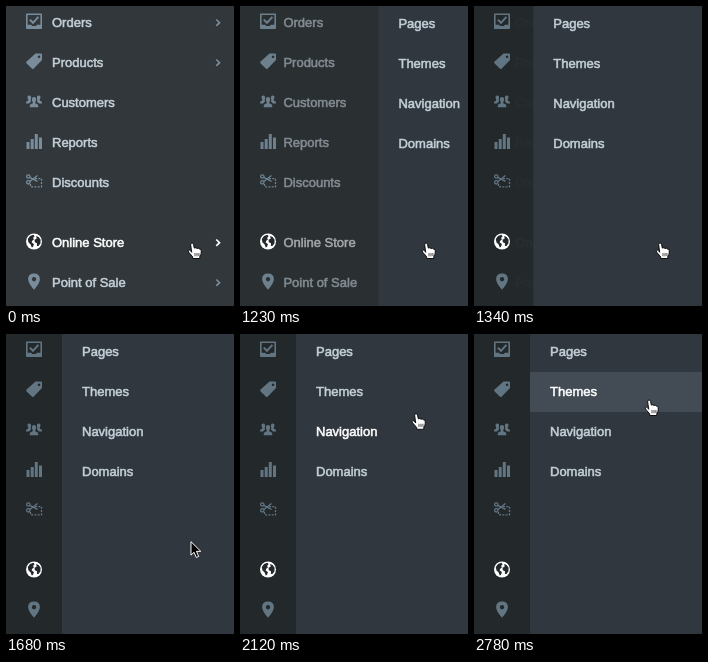
Write an HTML page that moves like this. It is 228 px wide and 300 px high and loops after 3.92 s.

```html
<!DOCTYPE html>
<html lang="en">
<head>
<meta charset="utf-8">
<title>Sliding navigation</title>
<style>
html, body { margin: 0; width: 100%; height: 100%; overflow: hidden; background: #31373a; }
svg { display: block; width: 228px; height: 300px; }
text { font: 13px "Liberation Sans", Arial, sans-serif; fill: currentColor; stroke: currentColor; stroke-width: .55px; }
.line { fill: none; stroke: currentColor; }
</style>
</head>
<body>
<svg viewBox="0 0 228 300">
  <rect id="side" width="228" height="300"/>
  <g id="icons" fill="currentColor">
    <path class="line" stroke-width="1.6" stroke-linejoin="round" d="M20.8 8.3h14.4v14H20.8z"/>
    <path class="line" stroke-width="2" d="M23.8 13.6l3.2 3.2 5.4-6"/>
    <path d="M21 18.8h4l1.200 1.200h3.600l1.200-1.200h4V22H21z"/>
    <path fill-rule="evenodd" d="M29.5 47.500h5.500q1 0 1 1v5.500l-8.200 8.500q-1 1-2 0l-5.200-5q-1-1 0-2zM33 49.500a1.300 1.300 0 1 0 .1 0z"/>
    <path d="M23.400 89.500a2 2.300 0 0 1 1.600 3.300q-.8 1.800.2 2.700-1.700.9-2 2H20v-1q0-1.200 2-1.800.7-.8-.2-2.300-1-2.700 1.600-2.900zM32.600 89.500a2 2.300 0 0 0-1.600 3.300q.8 1.800-.2 2.700 1.700.9 2 2H36v-1q0-1.200-2-1.800-.7-.8.2-2.300 1-2.700-1.600-2.900z"/>
    <path d="M28 91q2.300 0 2.100 3-.2 1.500-.9 2.300v1q3.100.8 3.100 2.600v1.400h-8.600v-1.400q0-1.800 3.100-2.600v-1q-.7-.8-.9-2.300Q25.700 91 28 91z"/>
    <path d="M20.500 136h3v7h-3zM24.700 133h3v10h-3zM28.800 128h3v15h-3zM33 131.500h3V143h-3z"/>
    <g class="line" stroke-width="1.300">
      <circle cx="22.300" cy="170.500" r="1.700"/><circle cx="22.300" cy="176.300" r="1.700"/>
      <path d="M23.800 171.400l7.700 4M23.800 175.400l7.700-5.800"/>
      <path stroke-dasharray="2 1.300" d="M29 172.600h6.500v8.200H24.500v-3"/>
    </g>
    <g color="#fff">
      <circle cx="28" cy="235.500" r="8" fill="currentColor"/>
      <path fill="#23282c" d="M21.800 233l2.200-3 3.400-1.200 1.200 1.500-1.600 1.600 1 1.300-2 1.700-.3 1.700 2.200 1.400-.8 2.700-1.300.7-1.300-3.200-2-1.700zM30 230l2.600 1 2 2.800-.2 3.700-2 2.600-1.500-.2.100-2.700-2.200-1-.2-2.400 2.200-1.300z"/>
    </g>
    <path fill-rule="evenodd" d="M28 267.500q5.900 0 5.900 5.800 0 3.700-5.900 10.500-5.900-6.800-5.900-10.500 0-5.800 5.900-5.800zm0 3.500a2.200 2.200 0 1 0 .1 0z"/>
  </g>
  <g id="labels"></g>
  <g id="chevrons"></g>
  <g id="panel">
    <rect width="228" height="300" fill="#31373e"/>
    <rect id="row" y="38" width="228" height="40" fill="#434c55"/>
  </g>
  <g id="hand" stroke="#000" stroke-linejoin="round">
    <path fill="#fff" stroke-width=".9" d="M4.200 9.800L3.200 2.400Q3 .7 4.400.5 5.700.4 6 1.800L6.800 5.600Q8.800 4.600 9.400 6 11.200 5.200 11.800 6.500 13.500 6.200 13.700 8V10.500Q13.700 12 12.300 13.800V16H5.200V14.300L1 9.500Q.2 8 1.400 7.400 2.500 7 4.200 9.800z"/>
    <path fill="none" stroke-width=".7" d="M7.500 10.500v3.300M9.500 10.500v3.300M11.400 10.500v3"/>
  </g>
  <path id="arrow" fill="#000" stroke="#fff" d="M0 0v13.500l3.100-2.900 2.200 5.200 2.400-1-2.200-5.100h4.300z"/>
</svg>
<script>
const $ = id => document.getElementById(id);
const LOOP = 3920, OPEN = 1206, SLIDE = 172, EDGE = 56;
const TEXT = '#c4d0d9', ICON = '#798c9c';

function add(parent, tag, attrs, content = '') {
  const el = document.createElementNS('http://www.w3.org/2000/svg', tag);
  for (const name in attrs) el.setAttribute(name, attrs[name]);
  el.textContent = content;
  return parent.appendChild(el);
}

const menu = [['Orders', 16, 1], ['Products', 56, 1], ['Customers', 96], ['Reports', 136],
  ['Discounts', 176], ['Online Store', 236, 1], ['Point of Sale', 276, 1]];
for (const [name, y, arrow] of menu) {
  const active = y === 236;
  add($('labels'), 'text', { x: 46, y: y + 5, color: active ? '#fff' : TEXT }, name);
  if (arrow) add($('chevrons'), 'path', {
    class: 'line', 'stroke-width': 1.7, color: active ? '#fff' : ICON, d: `M210.300 ${y - 2.5}l3.200 3.200-3.200 3.200`
  });
}
const links = ['Pages', 'Themes', 'Navigation', 'Domains'].map((name, i) =>
  add($('panel'), 'text', { x: 20, y: 22 + 40 * i }, name));

// Pointer stops: time, x, y
const path = [[1600, 186, 237], [1680, 185, 208], [1800, 182, 167], [2000, 177.5, 104],
  [2120, 176, 80], [2140, 176, 75], [2310, 175.5, 69], [2440, 175.5, 69], [2540, 175, 66]];

function pointer(t) {
  const i = path.findIndex(p => p[0] > t);
  if (i === 0) return path[0].slice(1);
  if (i < 0) return path.at(-1).slice(1);
  const [a, b] = [path[i - 1], path[i]], k = (t - a[0]) / (b[0] - a[0]);
  return [1, 2].map(j => a[j] + (b[j] - a[j]) * k);
}

const mix = (a, b, k) => `rgb(${a.map((v, i) => v + (b[i] - v) * k)})`;
const move = (el, x, y) => el.setAttribute('transform', `translate(${x} ${y})`);

function draw(now) {
  const t = now % LOOP;
  const left = t < OPEN ? 1 : t > 1590 ? 0 : Math.exp((OPEN - t) / 34);
  const [x, y] = pointer(t);

  move($('panel'), EDGE + SLIDE * left, 0);
  move($('labels'), -5 * (1 - left), 0);
  $('labels').style.opacity = Math.min(1, left * 1.2);
  $('side').style.fill = mix([49, 55, 58], [35, 40, 43], 1 - left);
  $('icons').style.color = mix([121, 140, 156], [98, 117, 130], 1 - left);

  const hover = y < 158 ? Math.floor((y + 2) / 40) : -1;
  links.forEach((el, i) => el.style.color = i === hover ? '#fff' : TEXT);
  $('row').style.opacity = t < 2780 ? 0 : 1;

  const hand = t < 1620 || hover >= 0;
  $('hand').style.display = hand ? '' : 'none';
  $('arrow').style.display = hand ? 'none' : '';
  move($('hand'), x - 4.5, y - .5);
  move($('arrow'), x, y);
}

const start = performance.now();
function tick() {
  draw(performance.now() - start);
  requestAnimationFrame(tick);
}
tick();
</script>
</body>
</html>
```
